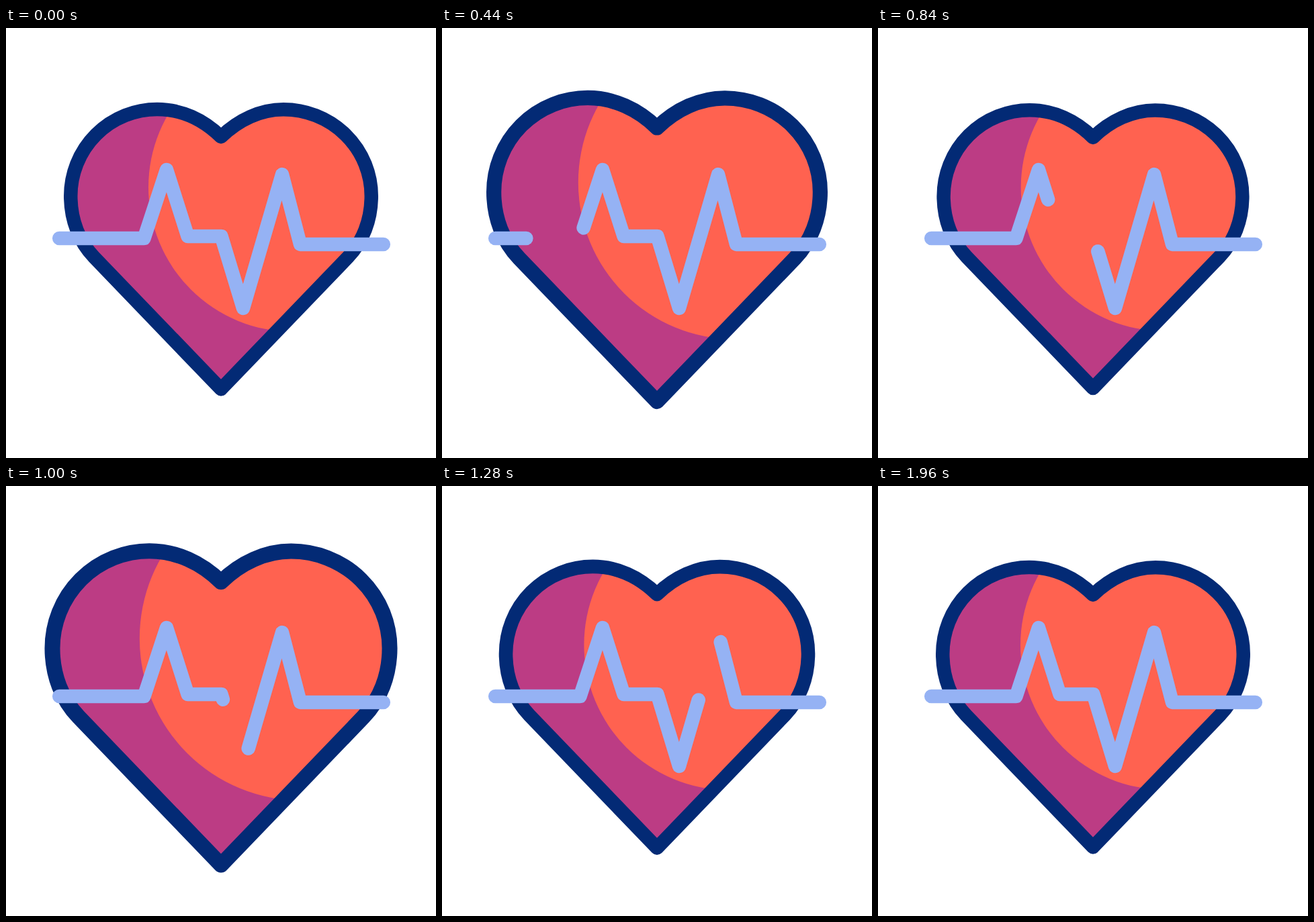
An HTML page for the animation above (2 s loop, 640x640 px).

```html
<!DOCTYPE html>
<html lang="en">
<head>
<meta charset="utf-8">
<title>Heartbeat</title>
<style>
  html, body { margin: 0; width: 100%; height: 100%; overflow: hidden; background: #fff; }
  svg { display: block; width: 100%; height: 100%; }
  path { stroke-linecap: round; stroke-linejoin: round; stroke-width: 20.5; fill: none; }
  .outline { stroke: #032a75; }
  .pulse { stroke: #95b2f4; }
</style>
</head>
<body>
<svg viewBox="0 0 640 640">
  <defs>
    <path id="shape" d="M320 162C294 136.5 261 121 225 121A128.75 129 0 0 0 96.25 250C96.25 286 109 318 131 341L320 537.5L509 341C531 318 543.75 286 543.75 250A130.75 128.75 0 0 0 413 121.25C379 121.25 346 136.5 320 162Z"/>
    <clipPath id="inside"><use href="#shape"/></clipPath>
  </defs>
  <g id="heart">
    <g clip-path="url(#inside)">
      <rect width="640" height="640" fill="#bc3c84"/>
      <circle cx="427" cy="237" r="215" fill="#ff6250"/>
    </g>
    <use href="#shape" class="outline"/>
  </g>
  <path id="head" class="pulse"/>
  <path id="tail" class="pulse"/>
</svg>
<script>
const LOOP = 2000;
const PULSE = "M79.2 313H205.5L239 211L270.5 310H320.5L353 417L411 218L438 322H561.8";
const BEAT = [[0, 1], [255, 0.902], [460, 1.09], [725, 0.94], [1066, 1.141], [1310, 1]];

const [heart, head, tail] = ["heart", "head", "tail"].map(id => document.getElementById(id));
head.setAttribute("d", PULSE);
tail.setAttribute("d", PULSE);
const length = head.getTotalLength();

const clamp = x => Math.min(1, Math.max(0, x));

// Symmetric cubic easing: control points (a, 0) and (1 - a, 1).
function ease(x, a) {
  if (x <= 0 || x >= 1) return clamp(x);
  let lo = 0, hi = 1, u;
  for (let i = 0; i < 24; i++) {
    u = (lo + hi) / 2;
    const bx = 3 * a * u * (1 - u) ** 2 + 3 * (1 - a) * u * u * (1 - u) + u ** 3;
    if (bx < x) lo = u; else hi = u;
  }
  return u * u * (3 - 2 * u);
}

const progress = (t, from, to, a) => ease((t - from) / (to - from), a);

function beatScale(t) {
  const i = BEAT.findIndex(([time]) => time > t);
  if (i < 0) return 1;
  const [t0, s0] = BEAT[i - 1], [t1, s1] = BEAT[i];
  return s0 + (s1 - s0) * progress(t, t0, t1, 1 / 3);
}

function showPart(path, from, to) {
  path.style.display = to > from ? "" : "none";
  path.setAttribute("stroke-dasharray", `${to - from} 2000`);
  path.setAttribute("stroke-dashoffset", -from);
}

function render(t) {
  const s = beatScale(t);
  heart.setAttribute("transform", `translate(320 320) scale(${s}) translate(-320 -320)`);
  // A gap runs along the pulse line between these two ends.
  showPart(head, 0, length * progress(t, 240, 1960, 0.265));
  showPart(tail, length * progress(t, 42, 1800, 0.265), length);
}

const start = performance.now();
function tick() {
  render((performance.now() - start) % LOOP);
  requestAnimationFrame(tick);
}
tick();
</script>
</body>
</html>
```
